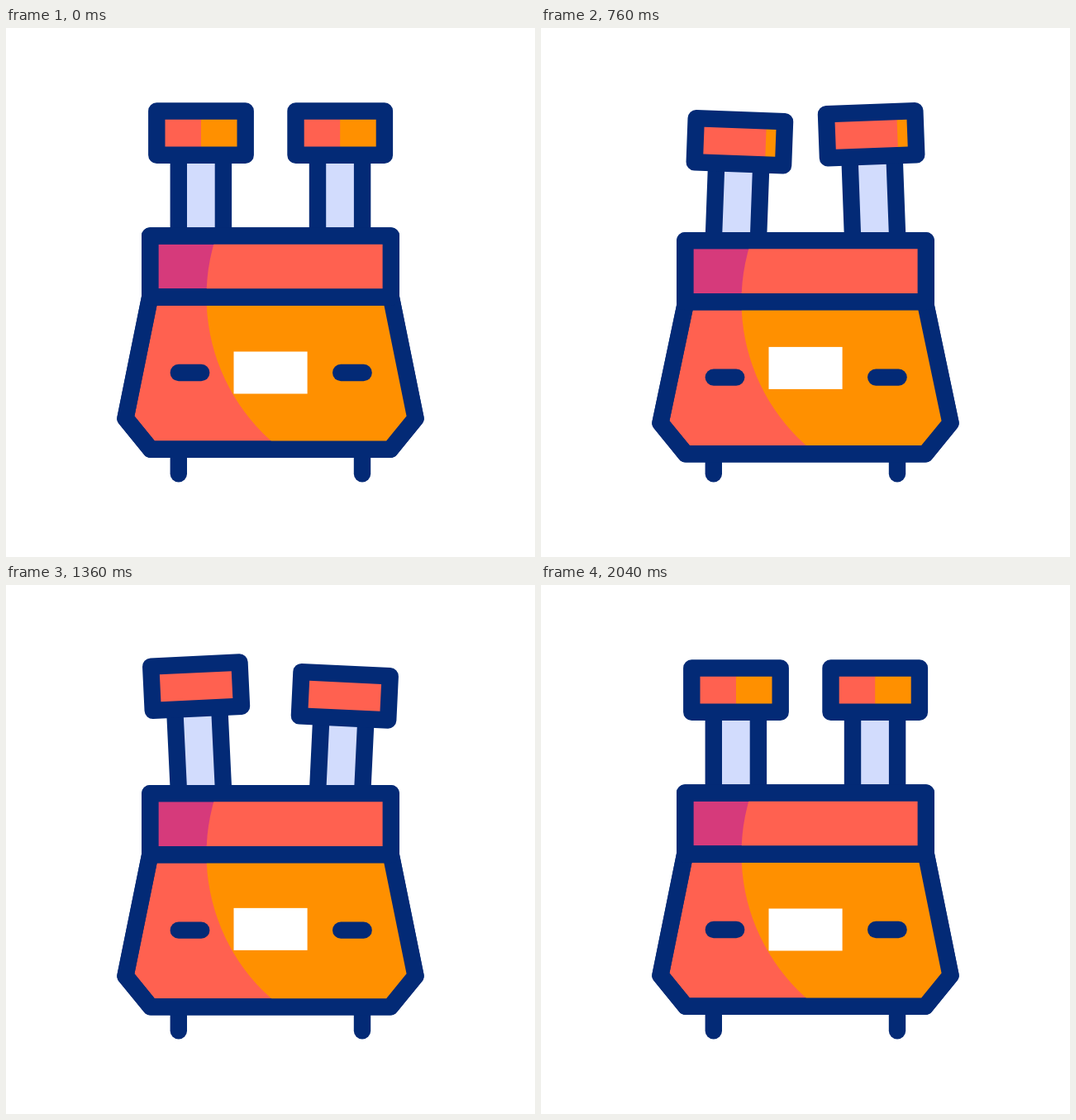
An HTML page with a canvas that plays this animation: 640 px wide and 640 px high, repeating every 2.2 s.

```html
<!DOCTYPE html>
<html lang="en">
<head>
<meta charset="utf-8">
<title>Binoculars</title>
<style>
html, body { margin: 0; width: 100%; height: 100%; overflow: hidden; background: #fff; }
canvas { display: block; width: 640px; height: 640px; }
</style>
</head>
<body>
<canvas id="stage" width="640" height="640"></canvas>
<script>
const ctx = document.getElementById('stage').getContext('2d');
const NAVY = '#032a76', CORAL = '#ff6150', ORANGE = '#ff9000',
      PINK = '#d63a7b', PALE = '#d2dcfd', WHITE = '#fff';
const LOOP = 2200, STEP = 40, BEGIN = 200, END = 2033;
const SWING = 1300 / 3, BOUNCE = 400;
const LINE = 20.4, EYE_GAP = 168.2, MID = 320;

const smooth = p => p * p * (3 - 2 * p);

// Body dips four times, then rests
function bob(t) {
  const n = (t - BEGIN) / BOUNCE;
  if (n <= 0 || n >= 4) return 0;
  return 6.25 * smooth(1 - Math.abs(2 * (n % 1) - 1));
}

// Degrees: four alternating extremes, one per SWING
function tilt(t) {
  if (t <= BEGIN || t >= END) return 0;
  const peak = k => k < 1 || k > 4 ? 0 : k % 2 ? -3.05 : 3.05;
  const k = Math.floor(t / SWING);
  const from = Math.max(BEGIN, k * SWING), to = Math.min(END, (k + 1) * SWING);
  return peak(k) + (peak(k + 1) - peak(k)) * smooth((t - from) / (to - from));
}

// Coral slides over the lens and back, fullest at each extreme of the tilt
function shine(t) {
  const rise = 230, dt = t - (SWING - rise);
  if (dt <= 0 || dt >= 4 * SWING) return 0;
  const s = dt % SWING;
  return 57 * smooth(s < rise ? s / rise : (SWING - s) / (SWING - rise));
}

function box(x, y, w, h, color) {
  ctx.fillStyle = color;
  ctx.fillRect(x, y, w, h);
}

function trace(points) {
  ctx.beginPath();
  points.forEach(([x, y]) => ctx.lineTo(x, y));
  ctx.closePath();
}

function line(x0, y0, x1, y1) {
  ctx.beginPath();
  ctx.moveTo(x0, y0);
  ctx.lineTo(x1, y1);
  ctx.stroke();
}

function eyepiece(x, deg, dy, slide) {
  const px = 114, py = 248;
  ctx.save();
  ctx.translate(x + px, py + dy + Math.abs(deg) * 0.2);
  ctx.rotate(deg * Math.PI / 180);
  ctx.translate(-px, -py);
  box(208.8, 154, 54.1, 121, PALE);
  for (const side of [208.8, 262.9]) line(side, 154, side, 275);
  box(182.3, 100.5, 107.4, 53.3, CORAL);
  const rest = 43.5 - slide;
  if (rest > 0) box(279.5 - rest, 100.5, rest + 5, 53.3, ORANGE);
  ctx.strokeRect(182.3, 100.5, 107.4, 53.3);
  ctx.restore();
}

// Mirrors the left half of an outline and parts it in two tones by a large circle
function shell(half, left, right) {
  const mirrored = half.map(([x, y]) => [2 * MID - x, y]).reverse();
  ctx.save();
  trace([...half, ...mirrored]);
  ctx.fillStyle = left;
  ctx.fill();
  ctx.stroke();
  ctx.clip();
  ctx.beginPath();
  ctx.arc(476.5, 325, 234, 0, Math.PI * 2);
  ctx.fillStyle = right;
  ctx.fill();
  ctx.restore();
  trace([...half, ...mirrored]);
  ctx.stroke();
}

function body(dy) {
  ctx.save();
  ctx.translate(0, dy);
  shell([[174.2 + dy * 0.2, 325.5], [144.5, 472.3], [175, 509.7]], CORAL, ORANGE);
  shell([[174.2, 251.5], [174.2, 325.5]], PINK, CORAL);
  for (const x of [208.8, 405.2]) line(x, 417, x + 27.4, 417);
  ctx.restore();
  box(275.5, 391.5 - dy, 89.1, 51, WHITE);
}

function draw(t) {
  const dy = bob(t), deg = tilt(t), slide = shine(t);
  box(0, 0, 640, 640, WHITE);
  ctx.strokeStyle = NAVY;
  ctx.lineWidth = LINE;
  ctx.lineCap = ctx.lineJoin = 'round';
  for (const x of [208.8, 431]) line(x, 510, x, 539.3);
  eyepiece(0, deg, dy, slide);
  eyepiece(EYE_GAP, -deg, dy, slide);
  body(dy);
}

const start = performance.now();
function tick() {
  const t = (performance.now() - start) % LOOP;
  draw(Math.floor(t / STEP) * STEP);
  requestAnimationFrame(tick);
}
tick();
</script>
</body>
</html>
```
